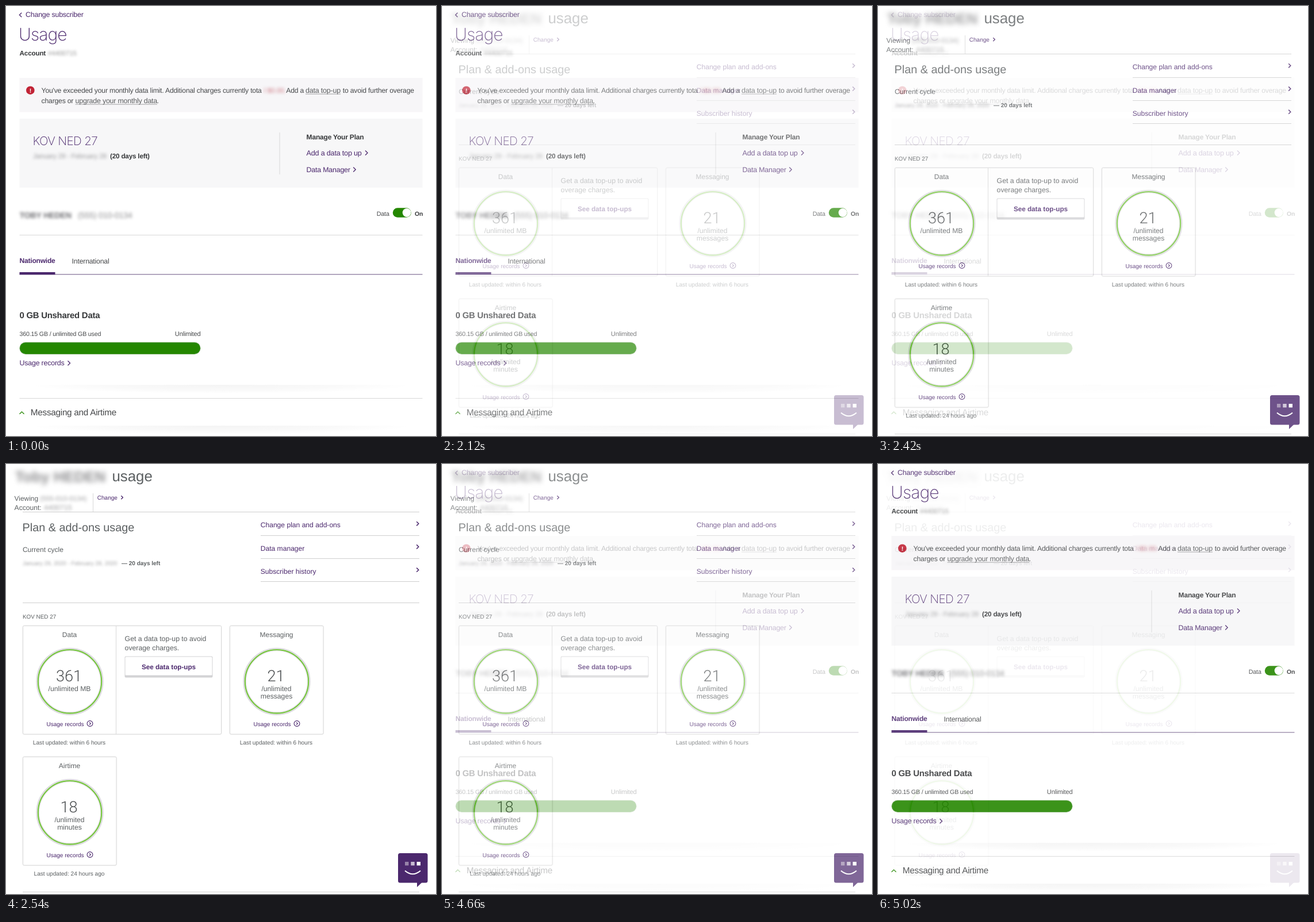
Recreate the animation shown at these times as an HTML page with a canvas. Size 748 by 748 pixels, loop 5080 ms.

```html
<!DOCTYPE html>
<html lang="en">
<head>
<meta charset="utf-8">
<title>Usage page, two designs</title>
<style>
html, body { margin: 0; width: 100%; height: 100%; overflow: hidden; background: #fff; }
canvas { display: block; width: 748px; height: 748px; }
</style>
</head>
<body>
<canvas id="stage"></canvas>
<script>
const SIZE = 748, LOOP = 5080, HOLD = 2000, STEP = 60, FADE = 540;
const PURPLE = '#4b286d', GREEN = '#248700', INK = '#47494b', DARK = '#36383a';
const GREY = '#5c6062', RULE = '#d8d8d8';
const SANS = '"Liberation Sans", Arial, sans-serif';
const LIGHT = 'Roboto, "Liberation Sans", sans-serif';
const HEAD = 'Inter, Roboto, sans-serif';
const dpr = window.devicePixelRatio || 1;
let c, tracking;

function prepare(canvas) {
  canvas.width = canvas.height = Math.round(SIZE * dpr);
  const g = canvas.getContext('2d');
  g.scale(dpr, dpr);
  return g;
}

function page(draw, spacing) {
  const canvas = document.createElement('canvas');
  c = prepare(canvas);
  tracking = spacing;
  c.fillStyle = '#fff';
  c.fillRect(0, 0, SIZE, SIZE);
  c.textRendering = 'geometricPrecision';
  draw();
  return canvas;
}

function text(s, x, y, size, color = INK, { weight = 400, family = SANS, align = 'left', spacing = tracking } = {}) {
  c.font = `${weight} ${size}px ${family}`;
  c.letterSpacing = spacing * size + 'px';
  c.textAlign = align;
  c.fillStyle = color;
  c.fillText(s, x, y);
  return c.measureText(s).width;
}
const bold = (s, x, y, size, color = DARK, align = 'left') => text(s, x, y, size, color, { weight: 700, align });
const center = (s, x, y, size, color = GREY) => text(s, x, y, size, color, { align: 'center' });
const heading = (s, x, y, size) =>
  text(s, x, y, size, PURPLE, { weight: 200, family: HEAD, spacing: -0.03 });

function link(s, x, y, size) {
  const w = text(s, x, y, size, '#5b5d5f');
  box(x, y + 1.7, w, 0.7, '#77797b');
}

function blurred(s, x, y, size, color, radius, weight = 400) {
  c.save();
  c.filter = `blur(${radius * dpr}px)`;
  text(s, x, y, size, color, { weight });
  c.restore();
}

function box(x, y, w, h, color) {
  c.fillStyle = color;
  c.fillRect(x, y, w, h);
}

function pill(x, y, w, h, r, fill) {
  c.beginPath();
  c.roundRect(x, y, w, h, r);
  c.fillStyle = fill;
  c.fill();
}

function circle(x, y, r, color, width) {
  c.beginPath();
  c.arc(x, y, r, 0, Math.PI * 2);
  if (width) {
    c.strokeStyle = color;
    c.lineWidth = width;
    c.stroke();
  } else {
    c.fillStyle = color;
    c.fill();
  }
}

// Right-pointing chevron centred on x, y; turned by angle.
function chevron(x, y, h = 4, angle = 0, color = PURPLE, width = 1.3) {
  c.save();
  c.translate(x, y);
  c.rotate(angle);
  c.beginPath();
  c.moveTo(-h / 2, -h);
  c.lineTo(h / 2, 0);
  c.lineTo(-h / 2, h);
  c.strokeStyle = color;
  c.lineWidth = width;
  c.stroke();
  c.restore();
}

function softShadow(y) {
  c.save();
  c.beginPath();
  c.rect(24, y, 701, 17);
  c.clip();
  c.translate(374, y);
  c.scale(1, 0.045);
  const g = c.createRadialGradient(0, 0, 0, 0, 0, 335);
  g.addColorStop(0, 'rgba(0,0,0,.045)');
  g.addColorStop(0.6, 'rgba(0,0,0,.025)');
  g.addColorStop(1, 'rgba(0,0,0,0)');
  c.fillStyle = g;
  c.fillRect(-350, 0, 700, 400);
  c.restore();
}

function firstPage() {
  chevron(25.3, 15.5, 3.8, Math.PI);
  text('Change subscriber', 34, 19, 12.4, PURPLE);
  heading('Usage', 22, 60, 30);
  bold('Account', 23.6, 86, 11.7);
  blurred('#4400715', 73, 86, 11.5, '#999', 2.2);

  box(23.5, 125, 701, 59.5, '#f7f6f8');
  circle(42.3, 146.7, 7.3, '#c12335');
  bold('!', 42.3, 150.6, 10.5, '#fff', 'center');
  text("You've exceeded your monthly data limit. Additional charges currently tota", 61.6, 151, 12.2);
  blurred('l $0.00.', 449, 151, 12, '#cf7c86', 2.4);
  text('Add a', 487.3, 151, 12.2);
  link('data top-up', 521, 151, 12.5);
  text('to avoid further overage', 585.8, 151, 12.2);
  text('charges or', 61.6, 169, 12.2);
  link('upgrade your monthly data', 120.6, 169, 12.4);
  text('.', 262.5, 169, 12.2);

  box(23.5, 196, 701, 120, '#f7f7f8');
  heading('KOV NED 27', 46.5, 241.5, 20.6);
  blurred('January 29 - February 28', 47, 265, 11.8, '#9a9a9c', 2.4);
  bold('(20 days left)', 181, 265, 11.7);
  box(475.5, 220, 1, 73, RULE);
  bold('Manage Your Plan', 522.6, 231.5, 12);
  text('Add a data top up', 522.6, 259.5, 12.6, PURPLE);
  chevron(627, 255.5);
  text('Data Manager', 522.6, 288.8, 12.4, PURPLE);
  chevron(606.2, 284.5);

  blurred('TOBY HEDEN', 23.5, 369, 14.2, '#6c6c70', 2.5, 700);
  blurred('(555) 010-0134', 125, 369, 14.3, '#8c8c8e', 2.5);
  text('Data', 644.8, 364.5, 10.7);
  pill(672.8, 351.2, 32, 16.6, 8.3, GREEN);
  circle(697.1, 359.5, 7.4, '#fff');
  bold('On', 711, 365, 10.4);
  box(23.5, 398, 701, 1, RULE);

  bold('Nationwide', 23.5, 447, 12, PURPLE);
  text('International', 114.6, 448.3, 12.25);
  box(23.5, 466.4, 701, 1, '#68507f');
  box(23.5, 463, 62, 4.2, PURPLE);

  bold('0 GB Unshared Data', 23.5, 543, 14.9);
  text('360.15 GB / unlimited GB used', 23.5, 574, 10.65);
  text('Unlimited', 293.8, 574, 11.1);
  pill(23.5, 584.7, 315, 21.2, 10.6, '#7fae70');
  pill(24.2, 585.4, 313.6, 19.8, 9.9, GREEN);
  text('Usage records', 23.5, 625.3, 12.4, PURPLE);
  chevron(109.5, 621.3);

  softShadow(659);
  box(23.5, 682, 701, 1, RULE);
  chevron(27.5, 707.8, 4, -Math.PI / 2, GREEN);
  text('Messaging and Airtime', 42.8, 711.8, 15.25);
  softShadow(730);
}

function card(x, y, w) {
  c.beginPath();
  c.roundRect(x + 0.5, y + 0.5, w, 188.5, 2);
  c.save();
  c.shadowColor = 'rgba(0,0,0,.14)';
  c.shadowBlur = 2.5 * dpr;
  c.fillStyle = '#fff';
  c.fill();
  c.restore();
  c.strokeStyle = RULE;
  c.lineWidth = 1;
  c.stroke();
}

function meter(x, y, title, value, lines, updated) {
  const m = x + 81.5;
  center(title, m, y + 20, 12);
  circle(m + 0.5, y + 97.3, 55.8, '#dbdbdd', 5.6);
  circle(m + 0.5, y + 97.3, 55.2, '#6cc82a', 1.8);
  text(value, m - 1, y + 97, 27.2, '#4c4f51', { weight: 300, family: LIGHT, align: 'center' });
  lines.forEach((s, i) => center(s, m, y + 114 + i * 12.5, 12.2));
  text('Usage records', x + 41.5, y + 174.5, 10, PURPLE);
  circle(x + 117, y + 170.5, 4.9, PURPLE, 1.1);
  chevron(x + 117.2, y + 170.5, 2.2, 0, PURPLE, 1.2);
  center(updated, m - 0.5, y + 207, 10.1);
}

function chatButton() {
  pill(682, 677, 51.5, 51.5, 3.5, PURPLE);
  c.beginPath();
  c.moveTo(715, 727);
  c.lineTo(715, 736);
  c.lineTo(724.5, 727);
  c.fill();
  ['#9883a9', '#c8bcd2', '#fff'].forEach((color, i) => box(694 + i * 10.3, 692, 6.4, 6.4, color));
  c.beginPath();
  c.moveTo(694, 707.5);
  c.quadraticCurveTo(707.5, 719, 721, 707.5);
  c.strokeStyle = '#fff';
  c.lineWidth = 2;
  c.stroke();
}

function secondPage() {
  blurred('Toby HEDEN', 16, 31, 25.8, '#8c8c8e', 4, 700);
  text('usage', 184.5, 30, 25.8, GREY);
  text('Viewing', 14.6, 64, 11.9, GREY);
  blurred('(555-010-0134)', 59, 64, 11.8, '#a0a0a2', 2.5);
  text('Account:', 14.6, 80, 12.1, GREY);
  blurred('4400715', 66, 80, 12.5, '#a0a0a2', 2.5);
  box(151, 51, 1, 32, RULE);
  box(29, 83, 690, 1, '#cfcfcf');
  text('Change', 158.8, 62, 10, PURPLE);
  chevron(201.8, 58.2, 3, 0, PURPLE, 1.4);

  text('Plan & add-ons usage', 28.6, 117, 19.8, GREY);
  text('Current cycle', 28.9, 153, 12.05, GREY);
  blurred('January 29, 2020 - February 28, 2020', 29, 175.5, 9.8, '#a0a0a2', 2.1);
  bold('— 20 days left', 201, 175.5, 10, GREY);

  ['Change plan and add-ons', 'Data manager', 'Subscriber history'].forEach((s, i) => {
    const y = i * 40.2;
    text(s, 442.7, 110.3 + y, 12.1, PURPLE);
    chevron(716, 103.8 + y, 3.6, 0, PURPLE, 1.5);
    box(443, Math.round(123.5 + y), 276, 1, '#cfcfcf');
  });
  box(29, 241, 690, 1, '#cfcfcf');
  text('KOV NED 27', 29, 269, 9.9, GREY);

  card(29, 281, 345);
  box(191, 281, 1, 189, RULE);
  meter(29, 281, 'Data', '361', ['/unlimited MB'], 'Last updated: within 6 hours');
  text('Get a data top-up to avoid', 206.6, 308.3, 12.25, GREY);
  text('overage charges.', 206.6, 323.8, 12.25, GREY);
  pill(206.5, 334.5, 153, 37, 2, '#d3d3d5');
  pill(207.5, 335.5, 151, 32, 1.5, '#fff');
  bold('See data top-ups', 283, 357, 11.7, PURPLE, 'center');

  card(389, 281, 162.5);
  meter(389, 281, 'Messaging', '21', ['/unlimited', 'messages'], 'Last updated: within 6 hours');
  card(29, 509, 162.5);
  meter(29, 509, 'Airtime', '18', ['/unlimited', 'minutes'], 'Last updated: 24 hours ago');

  box(29, 744, 690, 1, '#cfcfcf');
  chatButton();
}

const first = page(firstPage, -0.016);
const second = page(secondPage, 0);
const view = prepare(document.getElementById('stage'));

// Share of the second page, in ten-percent steps.
function mix(t) {
  const half = HOLD + FADE;
  const u = t % half - HOLD;
  const p = u < 0 ? 0 : (Math.floor(u / STEP) + 1) / 10;
  return t >= half ? 1 - p : p;
}

function frame(now) {
  view.globalAlpha = 1;
  view.drawImage(first, 0, 0, SIZE, SIZE);
  view.globalAlpha = mix(now % LOOP);
  view.drawImage(second, 0, 0, SIZE, SIZE);
}

const start = performance.now();
function tick() {
  frame(performance.now() - start);
  requestAnimationFrame(tick);
}
tick();
</script>
</body>
</html>
```
